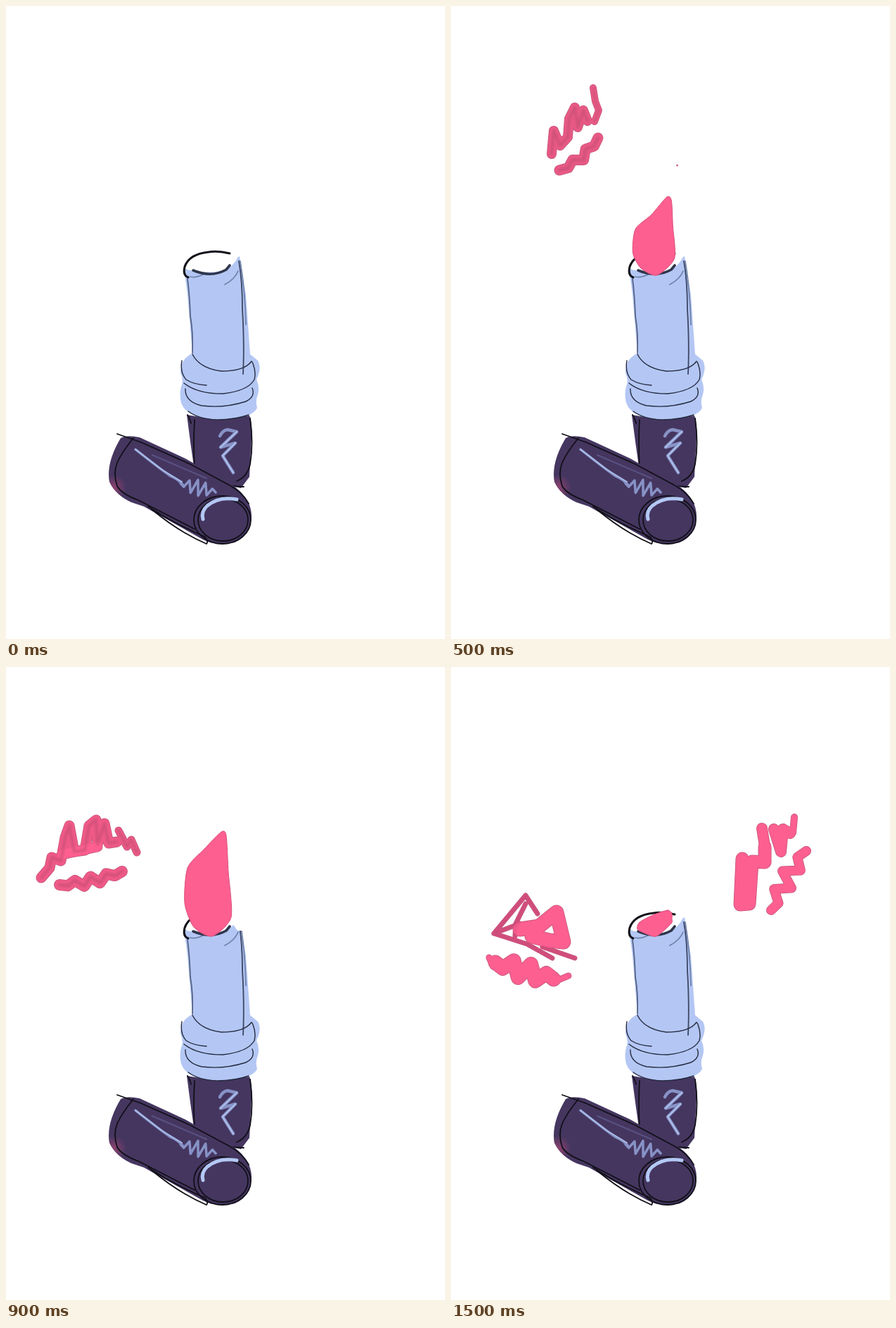
An HTML page for the animation above (1600 ms loop, 624 by 898 pixels).

```html
<!DOCTYPE html>
<html lang="en">
<head>
<meta charset="utf-8">
<title>Lipstick</title>
<style>
html, body { margin: 0; width: 100%; height: 100%; overflow: hidden; background: #fff; }
svg { display: block; width: 100vw; height: 100vh; }
path, ellipse { stroke-linecap: round; stroke-linejoin: round; }
.line { fill: none; stroke: #111018; stroke-width: 1.8; }
.thin { stroke: #252b40; stroke-width: 1.4; }
.soft { stroke: #53658f; stroke-width: 1.8; opacity: .7; }
.shine { fill: none; stroke: #8792c6; stroke-width: 3.5; }
</style>
</head>
<body>
<svg viewBox="0 0 624 898" preserveAspectRatio="none">
  <defs>
    <radialGradient id="blush">
      <stop offset="0" stop-color="#8d4270"/><stop offset="1" stop-color="#8d4270" stop-opacity="0"/>
    </radialGradient>
    <filter id="blur" x="-30%" y="-30%" width="160%" height="160%"><feGaussianBlur stdDeviation="1.8"/></filter>
    <clipPath id="capClip"><use href="#cap"/></clipPath>
  </defs>

  <!-- base -->
  <path fill="#453660" d="M257 580L300 587L346 581Q350 590 349 612L346 668L334 684L300 676L268 660L262 618Z"/>
  <path class="line" d="M258 580Q261 584 263 592M268 587Q266 620 268 655M347 585Q352 620 347 650Q343 668 328 674M318 681L338 682"/>
  <path class="shine" style="stroke-width:4.5" d="M304 610Q308 602 315 601L328 604L305 626L326 620L308 638L323 662"/>
  <path class="shine" style="stroke:#adc0ec;stroke-width:2" d="M328 604L305 626M326 620L308 638L323 662"/>

  <!-- cap -->
  <path id="cap" fill="#453660" d="M163 613Q172 608 190 612L255 642L325 682Q349 700 349 724Q347 752 325 761Q300 767 280 757L196 710L178 704Q156 694 147 675Q142 648 163 613Z"/>
  <circle cx="153" cy="683" r="18" fill="url(#blush)" clip-path="url(#capClip)"/>
  <path class="line" d="M158 607L192 619L262 650L318 680Q336 690 345 706M181 613Q164 634 158 648Q152 663 158 681Q164 692 188 701L268 742M202 710Q238 734 283 753Q288 760 285 763Q247 747 207 714"/>
  <ellipse class="line" cx="307.5" cy="729" rx="40.5" ry="34"/>
  <ellipse class="line" cx="308.5" cy="729" rx="35.5" ry="30"/>
  <path class="shine" d="M184 629Q218 656 234 667Q246 672 253 681"/>
  <path class="shine" style="stroke:#a9bce8;stroke-width:2" d="M184 629L222 658L250 675"/>
  <path class="shine" id="squiggle"/>
  <path class="shine" style="stroke:#66649a;stroke-width:2;opacity:.6" d="M208 637L285 670"/>
  <path class="shine" style="stroke:#b3c8f4;stroke-width:5" d="M328 700Q303 695 286 709Q277 717 280 728"/>

  <!-- tube and collar -->
  <path fill="#b4c7f4" d="M253 372L258 410L265 493Q248 500 248 520Q253 532 249 540Q246 550 249 563Q254 577 272 582Q300 590 329 584Q352 581 357 570Q354 561 358 551Q361 540 356 530Q364 514 358 503L347 494L341 410L332 355L320 362Q300 382 253 372Z"/>
  <path fill="#fff" d="M257 374Q253 361 270 353Q294 345 330 353Q329 363 314 374Q290 381 257 374Z"/>
  <path class="line thin" d="M265 494Q275 514 306 518Q339 518 349 504M250 503Q247 520 256 530Q267 537 285 538M253 535Q272 550 308 550Q344 546 353 530Q356 518 350 505M255 543Q254 561 278 567Q310 571 341 561Q355 554 350 542M259 575Q274 586 300 587Q325 587 345 580"/>
  <path class="line" style="stroke:#3d4969;opacity:.8" d="M258 387Q261 410 262 440Q266 462 265 492"/>
  <path class="line" style="stroke:#28304a;opacity:.85" d="M331 362Q336 390 336 430Q339 480 337 522"/>
  <path class="line soft" d="M333 362Q340 405 341 452M311 395Q325 388 330 376M262 384Q270 386 280 381"/>
  <path class="line" style="stroke-width:3" d="M259 385Q251 382 254 370Q260 352 288 349Q302 347 318 351"/>
  <path class="line" style="stroke:#30364c;stroke-width:3.6" d="M266 375Q292 386 313 374L318 368"/>
  <path id="notch" fill="#fff" d="M318 350H342V374L329 374L322 364Z"/>

  <g id="kisses"></g>
  <path id="bullet" fill="#fd5f90" stroke="#d9507f"/>
</svg>
<script>
const PINK = "#fd5f90", ROSE = "#e95a85", PLUM = "#cf517c", EDGE = "#c4557c", SHADE = "#ab456c";
const $ = id => document.getElementById(id);

function add(parent, tag, attrs) {
  const el = document.createElementNS("http://www.w3.org/2000/svg", tag);
  for (const key in attrs) el.setAttribute(key, attrs[key]);
  return parent.appendChild(el);
}

// Zigzag along a bowed line, widest in the middle.
function zigzag(x0, y0, x1, y1, turns, amp, bow = 0) {
  const len = Math.hypot(x1 - x0, y1 - y0), nx = (y0 - y1) / len, ny = (x1 - x0) / len;
  const pts = [];
  for (let i = 0; i <= turns; i++) {
    const u = i / turns, off = Math.sin(Math.PI * u) * (bow + (i % 2 ? amp : -amp));
    pts.push([x0 + (x1 - x0) * u + nx * off, y0 + (y1 - y0) * u + ny * off].map(v => v.toFixed(1)));
  }
  return "M" + pts.join("L");
}

// A kiss is a few thick brush strokes: [path, width, colour].
function kiss(strokes) {
  const g = add($("kisses"), "g", { fill: "none" });
  const paint = (d, stroke, width, more) => add(g, "path", { d, stroke, "stroke-width": width, ...more });
  for (const [d, w] of strokes) paint(d, EDGE, w + 1);
  for (const [d, w, color = PINK] of strokes) paint(d, color, w - .6);
  for (const [d, w, color] of strokes)
    if (color) paint(d, SHADE, w * .3, { opacity: .4, filter: "url(#blur)" });
  return g;
}

const kisses = [
  kiss([
    ["M414 272L411 337L424 336L428 276L446 277L446 255", 18],
    ["M442 229L447 260", 15],
    ["M459 230L469 262L472 230L482 236", 15],
    ["M488 213L486 235", 9],
    [zigzag(505, 261, 455, 345, 7, 12, 3), 13],
    ["M61 378L106 324L123 350M61 378L98 364M61 378L108 393L144 413M91 382L92 364L106 336M130 397L176 413", 6, "#d64f7e"],
    ["M98 372L125 368L150 348L160 390L140 388L115 382", 20],
    [zigzag(63, 419, 146, 443, 7, 12), 20],
    ["M54 412L60 425M148 446L167 438", 8]
  ]),
  kiss([
    ["M335 203L354 202L366 182L376 206L388 178L396 214L405 166L408 216L426 204L445 222L459 187L462 236L474 241", 18],
    ["M428 215L455 208L448 224", 18],
    ["M470 242L486 259", 10],
    ["M426 158Q416 168 413 195", 5, "#d64f7e"],
    ["M370 262L376 249L385 265L400 262L404 274L418 269", 17],
    ["M78 336L92 312L83 282L100 303L101 278L115 290L113 245L128 278L126 254L140 262L154 248", 18],
    ["M167 236L178 262L160 258", 20, "#ee5c8a"],
    [zigzag(166, 284, 111, 357, 7, 13, -12), 18],
    ["M90 453L112 459L138 472L140 458L150 468L155 482L180 482L190 496L205 511", 12, ROSE],
    [zigzag(106, 481, 167, 524, 7, 8), 12, PLUM]
  ]),
  kiss([
    ["M143 210L146 177L155 198L166 186L168 160L176 144L180 172L188 148L194 163", 13, ROSE],
    ["M202 116L205 135L210 148L204 164", 9, ROSE],
    [zigzag(154, 233, 209, 187, 6, 5, 6), 14, ROSE],
    ["M321.5 226V226.2", 1.5]
  ]),
  kiss([
    ["M50 299L62 285L65 270L78 275L84 242L90 225L97 262L112 260L118 225L128 217L130 252L140 222L146 250L158 248", 14, "#f05a87"],
    ["M160 232L172 255L178 245L186 263", 10, ROSE],
    ["M80 266L130 255", 14],
    [zigzag(76, 309, 165, 290, 8, 6, 4), 15, "#f05a87"]
  ])
];

$("squiggle").setAttribute("d", zigzag(248, 677, 298, 690, 9, 11));

// Bullet: the same key points barely out and fully out, mixed by the rise.
const low = [[308, 345], [314, 350], [314, 357], [313, 364], [292, 382], [276, 378], [265, 372], [268, 362], [289, 351]];
const high = [[306, 234], [313, 239], [316, 290], [320, 355], [293, 382], [267, 369], [254, 335], [258, 285], [282, 258]];

function bullet(rise) {
  const p = low.map((a, i) => a.map((v, c) => v + (high[i][c] - v) * (i > 5 ? rise ** 1.3 : rise)));
  const n = p.length, k = .12;
  let d = "M" + p[0];
  for (let i = 0; i < n; i++) {
    const [a, b, c, e] = [-1, 0, 1, 2].map(o => p[(i + o + n) % n]);
    d += "C" + [0, 1].map(j => b[j] + (c[j] - a[j]) * k) + "," + [0, 1].map(j => c[j] - (e[j] - b[j]) * k) + "," + c;
  }
  return d + "Z";
}

// Sixteen held drawings: eight steps up, then back down; each kiss lasts two.
function render(ms) {
  const tick = Math.floor(ms / 100) % 16;
  const step = 8 - Math.abs(8 - tick);
  kisses.forEach((g, i) => g.style.display = i === Math.ceil(step / 2) - 1 ? "" : "none");
  $("bullet").setAttribute("d", step ? bullet((step - 1) / 6) : "");
  $("notch").style.display = step >= 7 ? "" : "none";
}

const start = performance.now();
function loop() {
  render(performance.now() - start);
  requestAnimationFrame(loop);
}
loop();
</script>
</body>
</html>
```
